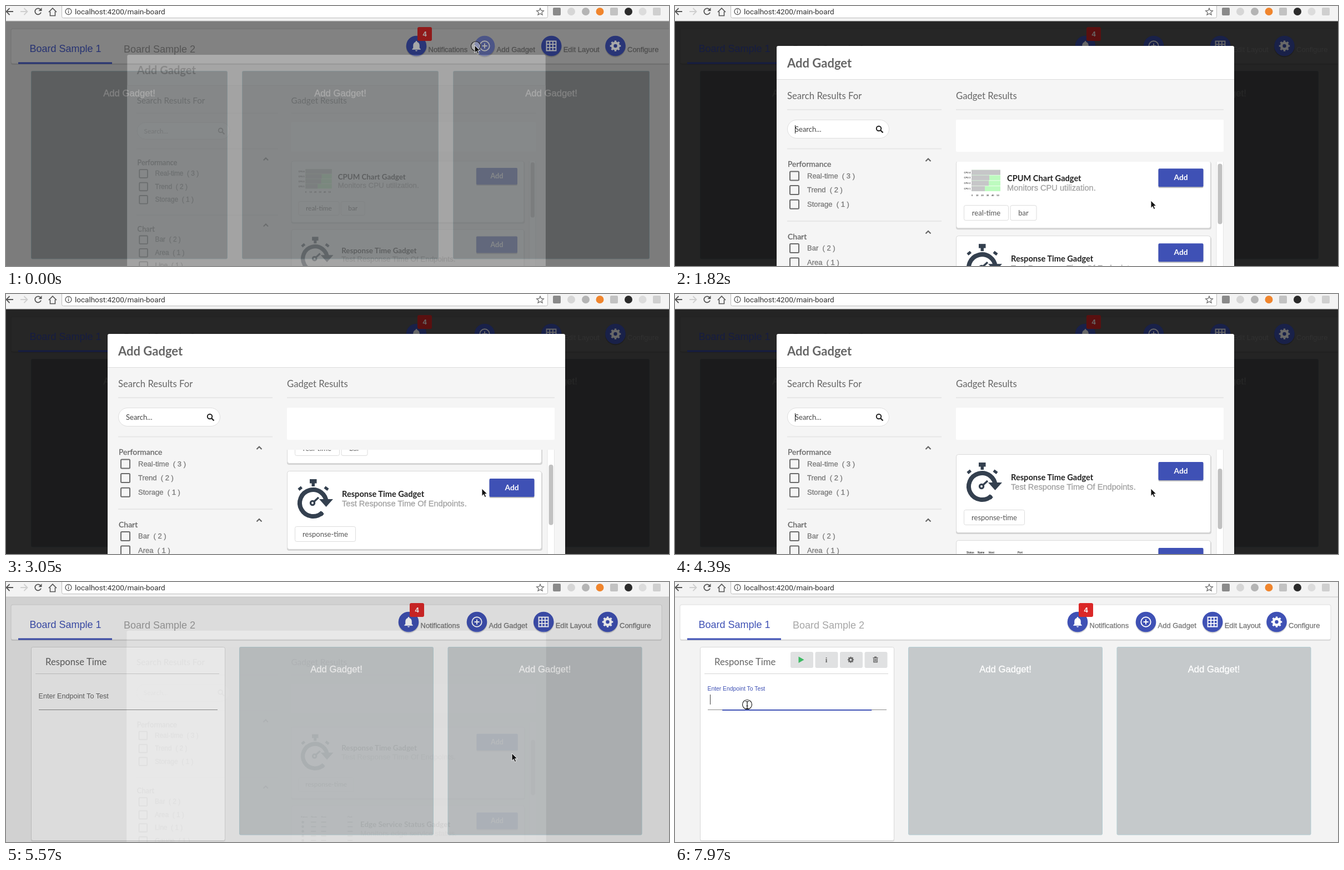
Write an HTML page that moves like this. It is 1194 px wide and 469 px high and loops after 8 s.

```html
<!DOCTYPE html>
<html lang="en">
<head>
<meta charset="utf-8">
<title>Gadget board</title>
<style>
html, body { margin: 0; width: 100%; height: 100%; overflow: hidden; background: #f3f3f3; }
svg { display: block; width: 1194px; height: 469px; font-family: "Liberation Sans", Arial, sans-serif; }
.lato { font-family: Lato, sans-serif; }
.roboto { font-family: Roboto, sans-serif; }
.b { font-weight: 700; }
.mid { text-anchor: middle; }
.firm { stroke: currentColor; stroke-width: .3px; }
</style>
</head>
<body>
<svg id="stage" viewBox="0 0 1194 469"></svg>
<script>
const BLUE = '#3f51b5', INK = '#34404f', LOOP = 8000;

const text = (x, y, size, fill, s, cls = '', extra = '') =>
  `<text x="${x}" y="${y}" font-size="${size}" fill="${fill}" color="${fill}" class="${cls}" ${extra}>${s}</text>`;
const rect = (x, y, w, h, fill, extra = '') =>
  `<rect x="${x}" y="${y}" width="${w}" height="${h}" fill="${fill}" ${extra}/>`;
const circle = (x, y, r, fill, extra = '') =>
  `<circle cx="${x}" cy="${y}" r="${r}" fill="${fill}" ${extra}/>`;
const line = (d, color, w = 1, extra = '') =>
  `<path d="${d}" fill="none" stroke="${color}" stroke-width="${w}" ${extra}/>`;
const fill = (d, color, extra = '') => `<path d="${d}" fill="${color}" ${extra}/>`;
const group = (id, body, extra = '') => `<g id="${id}" ${extra}>${body}</g>`;

const gear = (x, y, r, color) =>
  circle(x, y, r * .58, 'none', `stroke="${color}" stroke-width="${r * .48}"`) +
  circle(x, y, r * .85, 'none', `stroke="${color}" stroke-width="${r * .36}" pathLength="16" stroke-dasharray="1 1" stroke-dashoffset=".5"`);
const lens = (x, y, color) =>
  line(`M${x + 2.5} ${y + 2.5}l4 4`, color, 2.4) +
  circle(x - 1, y - 1, 4.2, 'none', `stroke="${color}" stroke-width="2"`);

function browserBar() {
  const dark = '#555', badge = (x, color, round = true) =>
    round ? circle(x, 10, 7, color) : rect(x - 7, 3, 14, 14, color, 'rx="2"');
  return rect(0, 0, 1194, 27, '#f3f3f3') + rect(0, 26.5, 1194, 1, '#c4c4c4') +
    rect(100.5, -6, 875, 27.5, '#fff', 'rx="3" stroke="#bdbdbd"') +
    line('M13 10H1M6.500 4L.5 10l6 6', dark, 1.8) +
    line('M26 10h12M32.500 4l6 6-6 6', '#cfcfcf', 1.8) +
    line('M62.500 7A5.500 5.500 0 1 0 63 11.500', dark, 1.8) + fill('M64.500 3v6h-6z', dark) +
    line('M77 11l7-7 7 7M79.500 10v7.500h9V10', dark, 1.6) +
    circle(112.500, 10, 5.500, 'none', `stroke="${dark}" stroke-width="1.3"`) +
    line('M112.500 9v4M112.500 6.500v1.500', dark, 1.3) +
    text(124, 14.700, 13.5, '#333', 'localhost:4200/main-board', 'roboto') +
    line('M962 4l1.800 4.200 4.600.4-3.500 3 1.100 4.500-4-2.400-4 2.400 1.100-4.500-3.500-3 4.600-.4z', '#666', 1.2) +
    badge(992, '#8a8a8a', false) + badge(1018, '#d6d6d6') + badge(1044, '#b4b4b4') + badge(1069.500, '#f0852d') +
    badge(1095, '#c2c2c2', false) + badge(1121, '#2b2b2b') + badge(1146.500, '#dcdcdc') + badge(1172, '#cfcfcf', false);
}

function tools() {
  const disc = (x, label, icon, id) =>
    circle(x, 74, 18.5, '#000', 'opacity=".16"') + circle(x, 72, 18.3, BLUE, id ? `id="${id}"` : '') + icon +
    text(x + 21.500, 83, 13, '#777', label, 'firm');
  const bell = '<g transform="translate(713.500 60.500) scale(.96)">' +
    fill('M12 22c1.1 0 2-.9 2-2h-4c0 1.1.9 2 2 2zm6-6v-5c0-3.100-1.600-5.600-4.500-6.300V4c0-.8-.7-1.500-1.500-1.500s-1.500.7-1.500 1.500v.7C7.600 5.400 6 7.900 6 11v5l-2 2v1h16v-1z', '#fff') + '</g>';
  const plus = circle(848, 72, 8.700, 'none', 'stroke="#fff" stroke-width="1.9"') + line('M848 67.500v9M843.500 72h9', '#fff', 1.9);
  const grid = line('M959.500 63.500h17v17h-17zM965.200 63.500v17M970.800 63.500v17M959.500 69.200h17M959.500 74.800h17', '#fff', 1.8);
  return disc(725, 'Notifications', bell) + disc(848, 'Add Gadget', plus, 'addDisc') +
    disc(968.200, 'Edit Layout', grid) + disc(1083.500, 'Configure', gear(1083.500, 72, 9.500, '#fff')) +
    rect(727, 38, 26, 25, '#db2828', 'rx="3"') + text(740, 55, 13, '#fff', '4', 'b mid');
}

function emptyCards(xs, w, color) {
  return xs.map(x => rect(x + .5, 117.500, w - 1, 338.500, color, 'rx="2" stroke="#b3cdd3"') +
    text(x + w / 2, 163, 16.7, '#fff', 'Add Gadget!', 'mid firm')).join('');
}

function gadget() {
  const btn = (x, icon) => rect(x, 126, 41, 29, '#e0e1e2', 'rx="3"') + icon;
  const trash = fill('M356.500 136h9v1.500h-9zM359 134.500h4v1.500h-4z', '#666') +
    line('M357.800 138v6.500h6.400V138M360 138.500v4.500M362 138.500v4.500', '#666', 1.3);
  return rect(45, 119, 350, 349, '#000', 'opacity=".1" rx="3"') +
    rect(45.500, 117.500, 349, 349, '#fff', 'rx="3" stroke="#d8d8d8"') +
    text(71, 150, 16.7, '#666', 'Response Time', 'lato') + rect(53, 165, 331, 1, '#d4d4d4') +
    group('gadgetTools',
      btn(208, fill('M222.500 134.500l10 5.700-10 5.700z', '#3cba63')) +
      btn(252.500, text(272.500, 145, 13, '#666', 'i', 'b mid', 'font-family="Liberation Serif, serif"')) +
      btn(297, gear(316.500, 140.300, 5.500, '#666')) + btn(341.500, trash)) +
    text(58.500, 209.500, 12.6, '#666', 'Enter Endpoint To Test', '', 'id="label"') +
    rect(59, 230, 322, 1, '#8a8a8a') + rect(0, 230, 0, 2, BLUE, 'id="underline"') +
    rect(63, 203, 1, 18, '#444', 'id="fieldCaret"');
}

function board() {
  return rect(0, 27, 1194, 442, '#f3f3f3') +
    rect(9, 42, 1172, 64, '#000', 'opacity=".1" rx="3" class="bar"') +
    rect(9, 41, 1172, 63, '#fff', 'rx="3" stroke="#dedede" class="bar"') +
    group('tabs', text(42.500, 83, 18, BLUE, 'Board Sample 1') + rect(22, 101.500, 169, 3, BLUE)) +
    text(212, 84, 18, '#a6a6a6', 'Board Sample 2') + group('tools', tools()) +
    group('before', emptyCards([45, 425, 805], 354, '#b4b9bb')) +
    group('after', emptyCards([420, 795.500], 350, '#c5c9cb') + gadget());
}

function resultCard(top, h, x, titleY, title, sub, tags, art) {
  const chips = tags.map(([cx, w, s]) =>
    rect(cx + .5, h - 41.500, w, 27, '#fff', 'rx="3" stroke="#dcdcdc"') +
    text(cx + w / 2 + .5, h - 23.500, 13, '#555', s, 'lato mid')).join('');
  return `<g transform="translate(0 ${top})">` +
    rect(506, 2, 460, h, '#000', 'opacity=".14" rx="4"') +
    rect(506.500, .5, 458, h - 1, '#fff', 'rx="4" stroke="#d9d9d9"') + art +
    text(x, titleY, 14.6, '#222', title, 'lato b') + text(x, titleY + 17, 14.6, '#a2a2a2', sub, 'firm') +
    rect(870.500, 16, 81, 33, '#000', 'opacity=".25" rx="2"') + rect(870.500, 14, 81, 33, BLUE, 'rx="2"') +
    text(911, 35, 13.7, '#fff', 'Add', 'lato b mid') + chips + '</g>';
}

function barArt() {
  const rows = [52, 32, 31, 24].map((w, i) => {
    const y = 16.500 + i * 9.800;
    return rect(534, y, 52, 9, '#bdfbbf') + rect(534, y, w, 9, '#c6c6c8') +
      text(520.500, y + 6, 4, '#444', 'CPU ' + (4 - i), 'b');
  }).join('');
  return rows + [0, 10, 20, 30, 40, 50].map((n, i) => text(535 + i * 9.300, 63.500, 4, '#444', n, 'b mid')).join('');
}

function watchArt() {
  return rect(547, 15, 12.500, 7.500, INK) + rect(550.500, 21, 5.500, 7, INK) +
    line('M570 75A24 24 0 1 1 577 58', INK, 8) + circle(567.5, 77.5, 4, INK) +
    fill('M564 51h25l-12.500 14z', INK) + circle(552, 58, 5.200, INK) + line('M552 58l11-10', INK, 3.500) +
    circle(552, 58, 1.900, '#fff') + line('M527 34l5.500-4.500M574 29.500l6 4.500', INK, 5);
}

function tableArt() {
  let s = '';
  [525, 545, 565, 617].forEach((x, c) => {
    s += text(x, 24, 4.5, '#333', ['Status', 'Name', 'Host', 'Port'][c], 'b');
    for (let r = 0; r < 5; r++)
      s += c ? rect(x, 32 + r * 9, 10, 2, '#777') : circle(x + 4, 33 + r * 9, 2.500, '#777');
  });
  return s;
}

function facet(top, name, items) {
  return line(`M451.500 ${top - 5}l4.500-4.500 4.500 4.500`, '#666', 2.2) + text(203, top + 5, 14, '#666', name, 'lato firm') +
    items.map(([s, n], i) => {
      const y = top + 21.500 + i * 25.600;
      return rect(207, y - 8, 16, 16, 'none', 'rx="1.5" stroke="#6a6a6a" stroke-width="2"') +
        text(238, y + 4, 13, '#777', `${s}\u00a0\u00a0( ${n} )`, 'firm');
    }).join('');
}

function modal() {
  const rule = (x, y, w) => rect(x, y - .8, w, 1.700, '#e5e5e5');
  const body = rect(183, 132, 824, 520, '#f5f5f5') + rect(183, 132, 824, 1, '#dcdcdc') +
    text(202, 168, 16.7, '#666', 'Search Results For', 'lato') + text(506, 168, 16.7, '#666', 'Gadget Results', 'lato') +
    rule(202, 187, 278) + rule(506, 187, 482) + rule(202, 257.500, 278) + rule(202, 388, 278) +
    rect(202.500, 205.500, 183, 33, '#fff', 'rx="16.5" stroke="#dedede"') +
    group('search', text(216, 227, 13, '#444', 'Search...', 'lato') + lens(368, 222, '#222')) +
    rect(216, 215, 1, 15, '#222', 'id="caret"') +
    facet(285, 'Performance', [['Real-time', 3], ['Trend', 2], ['Storage', 1]]) +
    facet(415.500, 'Chart', [['Bar', 2], ['Area', 1], ['Line', 1], ['Gauge', 1]]) +
    rect(506, 205, 482, 58, '#fff', 'rx="2"') +
    rect(975, 281, 12, 371, '#fff') + line('M975 281v371M987.500 281v371', '#e6e6e6') +
    rect(977.500, 284, 8, 109, '#c1c1c1', 'rx="4" id="thumb"') +
    '<g clip-path="url(#view)">' + group('list',
      resultCard(281, 122, 598, 36.500, 'CPUM Chart Gadget', 'Monitors CPU utilization.', [[520, 80, 'real-time'], [603.500, 47, 'bar']], barArt()) +
      resultCard(416, 142, 605, 47, 'Response Time Gadget', 'Test Response Time Of Endpoints.', [[520, 109, 'response-time']], watchArt()) +
      resultCard(571, 142, 642, 43, 'Edge Service Status Gadget', 'Monitors edge service status.', [], tableArt())) + '</g>';
  return rect(183, 72, 824, 580, '#fff', 'rx="3"') +
    text(202, 110.500, 22, '#666', 'Add Gadget', 'lato b', 'id="title"') + group('body', body);
}

const pointer = circle(2, 1.500, 8.500, '#fff', 'fill-opacity=".35" stroke="#222" stroke-width="1.2" id="ring"') +
  group('arrow', fill('M0 0v13.500l3.200-2.900 2.100 5 2.400-1-2.100-4.900h4.300z', '#111', 'stroke="#fff" stroke-width=".9"')) +
  group('beam', line('M-3.500-7q3 0 3.500 1.500 .5-1.500 3.500-1.500M0-6V6M-3.500 7q3 0 3.500-1.500 .5 1.500 3.500 1.500M-1.500 1.500h3', '#111', 1.2));

const stage = document.getElementById('stage');
stage.innerHTML = '<defs><clipPath id="view"><rect x="500" y="281" width="470" height="371"/></clipPath></defs>' +
  board() +
  group('dimmer', rect(0, 27, 1194, 442, '#000', 'opacity=".85"') +
    '<use href="#tools" opacity=".3"/><use href="#tabs" opacity=".25"/>' + group('modal', modal())) +
  browserBar() + group('pointer', pointer);

const el = {};
stage.querySelectorAll('[id]').forEach(n => el[n.id] = n);
const bars = stage.querySelectorAll('.bar');
const set = (n, attrs) => { for (const k in attrs) n.setAttribute(k, attrs[k]); };
const show = (n, on) => n.setAttribute('visibility', on ? 'inherit' : 'hidden');
const ramp = (t, a, b) => Math.min(1, Math.max(0, (t - a) / (b - a)));
const smooth = k => k * k * (3 - 2 * k);

// Interpolates rows of [time, ...values].
function track(rows, t, ease = k => k) {
  let i = 0;
  while (i < rows.length - 2 && t >= rows[i + 1][0]) i++;
  const [a, b] = [rows[i], rows[i + 1]], k = ease(ramp(t, a[0], b[0]));
  return a.slice(1).map((v, j) => v + (b[j + 1] - v) * k);
}

const SCROLL = [[1800, 0], [2340, 47], [2620, 70], [3050, 97], [3210, 97], [3560, 114], [3940, 127]];
const MOUSE = [[450, 844, 71], [740, 854, 345], [1340, 854, 345], [1460, 857, 351], [4480, 857, 351], [5060, 911, 309],
  [5660, 911, 309], [6000, 742, 288], [6270, 618, 268], [6420, 618, 268], [6720, 322, 228], [6860, 322, 228],
  [7080, 150, 211], [7420, 150, 211], [7700, 130, 222]];
const CLICK = 5230, FOCUS = 7780;

function draw(t) {
  const added = t >= CLICK, enter = .57 + .43 * ramp(t, 0, 300), leave = ramp(t, CLICK, CLICK + 407);
  const scale = added ? 1 - .1 * leave : .8 + .2 * enter;
  show(el.before, !added);
  show(el.after, added);
  bars.forEach(b => b.setAttribute('width', added ? 1172 : 1190));
  set(el.tools, { transform: `translate(${added ? 0 : 14} 0)` });
  set(el.addDisc, { fill: t < 250 ? '#7482cc' : BLUE });

  set(el.dimmer, { opacity: added ? 1 - leave : enter });
  set(el.modal, {
    opacity: added ? 1 - .75 * leave : enter * enter,
    transform: `translate(595 260) scale(${scale}) translate(-595 -260)`
  });
  show(el.title, !added);
  set(el.body, { transform: `translate(0 ${added ? -28 : 0})` });

  const [scroll] = track(SCROLL, t);
  set(el.list, { transform: `translate(0 ${-scroll})` });
  set(el.thumb, { y: 284 + scroll * .245 });
  set(el.search, { opacity: .5 + .5 * ramp(t, 430, 650) - .5 * ramp(t, 5100, 5200) });
  show(el.caret, t >= 430 && t < 5100 && Math.floor((t - 390) / 500) % 2 === 0);

  const [x, y] = track(MOUSE, t, smooth), typing = t > 6950;
  set(el.pointer, { transform: `translate(${x} ${y})` });
  show(el.arrow, !typing);
  show(el.beam, typing);
  show(el.ring, t < 90 || (t >= 5090 && t < 5250) || t >= FOCUS);
  set(el.ring, { cx: typing ? 0 : 2, cy: typing ? -1 : 1.5 });
  show(el.gadgetTools, added && t > 6420 && x < 395);

  const q = 1 - (1 - ramp(t, FOCUS, 7970)) ** 2;
  set(el.label, { y: 209.5 - 13.5 * q, 'font-size': 12.6 - 2.25 * q, fill: q ? BLUE : '#666' });
  set(el.underline, { x: 219.7 - 134.5 * q, width: 269 * q });
  show(el.fieldCaret, added && q > 0);
}

function tick(now) {
  draw(now % LOOP);
  requestAnimationFrame(tick);
}
draw(0);
requestAnimationFrame(tick);
</script>
</body>
</html>
```
